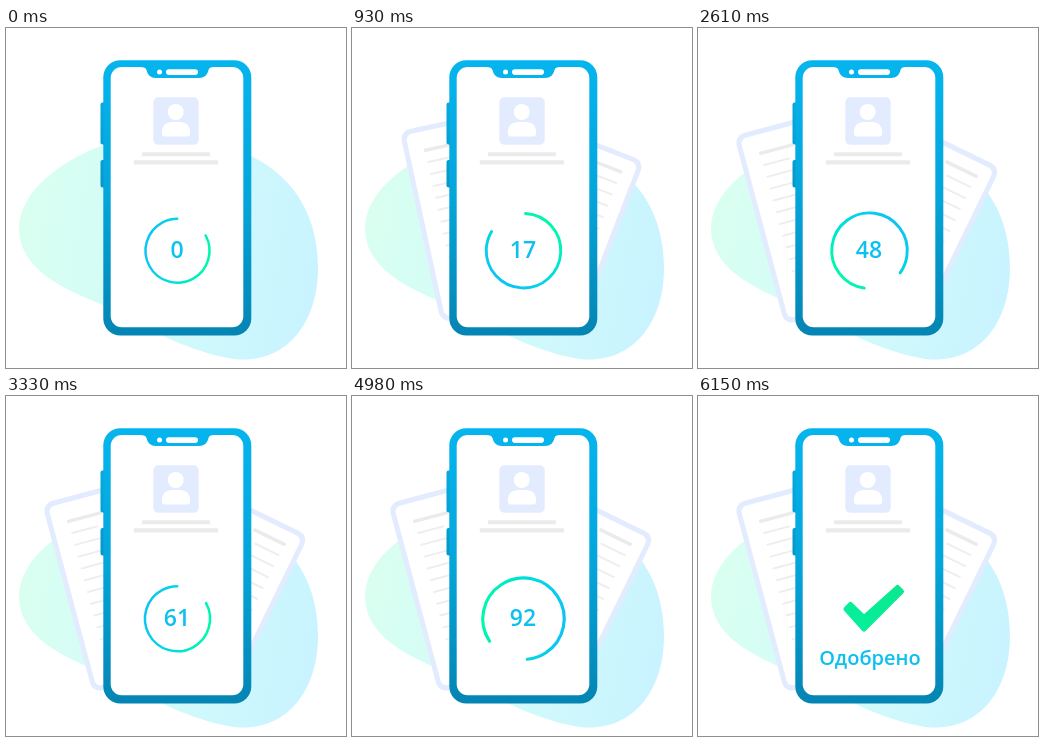
Recreate the animation shown at these times as an HTML page with a canvas. Size 340x340 px, loop 7.56 s.

```html
<!DOCTYPE html>
<html lang="ru">
<head>
<meta charset="utf-8">
<title>Одобрено</title>
<style>
  html, body { margin: 0; width: 100%; height: 100%; overflow: hidden; background: #fff; }
  canvas { display: block; width: 340px; height: 340px; }
</style>
</head>
<body>
<canvas id="stage"></canvas>
<script>
const SIZE = 340, LOOP = 7560, STEP = 30;
const DEG = Math.PI / 180;
const FONT = '"Open Sans", "Noto Sans", sans-serif';
const CYAN = '#0cc0f0', PALE = '#e3ebff', GREY = '#ebebeb';

const canvas = document.getElementById('stage');
const ctx = canvas.getContext('2d');
const dpr = window.devicePixelRatio || 1;
canvas.width = canvas.height = SIZE * dpr;

const clamp = v => Math.min(1, Math.max(0, v));
const span = (t, from, to) => clamp((t - from) / (to - from));
const easeSine = p => (1 - Math.cos(Math.PI * p)) / 2;
const easeOut = p => 1 - (1 - p) ** 3;

function gradient(x0, y0, x1, y1, ...colors) {
  const g = ctx.createLinearGradient(x0, y0, x1, y1);
  colors.forEach((c, i) => g.addColorStop(i / (colors.length - 1), c));
  return g;
}

function box(x, y, w, h, r, fill) {
  ctx.beginPath();
  ctx.roundRect(x, y, w, h, r);
  ctx.fillStyle = fill;
  ctx.fill();
}

function disc(x, y, r, fill) {
  ctx.beginPath();
  ctx.arc(x, y, r, 0, 2 * Math.PI);
  ctx.fillStyle = fill;
  ctx.fill();
}

function label(text, x, y, size) {
  ctx.font = `600 ${size}px ${FONT}`;
  ctx.textAlign = 'center';
  ctx.fillStyle = CYAN;
  ctx.fillText(text, x, y);
}

const blobPath = new Path2D(
  'M13 200C14 165 50 135 97 117C150 98 200 105 245 128C290 150 312 190 312 240' +
  'C312 300 275 340 222 330C185 323 150 306 97 277C60 262 13 242 13 200Z');
const notchPath = new Path2D(
  'M134 38H208V39C204.500 39 203 40 202.500 42C201.500 47 198 50 193 50' +
  'H150C145 50 141.500 47 140.500 42C140 40 138 39 134 39Z');
const personPath = new Path2D(
  'M156 106V104C156 97.500 160 94 166 94H174C180 94 184 97.500 184 104V106' +
  'Q184 108.500 181.500 108.500H158.500Q156 108.500 156 106Z');
const checkPath = new Path2D('M148 213L152.500 208.500L166 221.500L199.500 191.500L203.500 195.500L166 233Z');

function blob() {
  ctx.fillStyle = gradient(13, 190, 312, 245, '#d9fff0', '#d2fbfa', '#c9f3ff');
  ctx.fill(blobPath);
}

// A sheet hinged at its lower outer corner; side -1 leans left, 1 leans right.
function sheet(side, x, y, angle, h, firstLine, inset) {
  ctx.save();
  ctx.translate(x, y);
  ctx.rotate(side * angle * DEG);
  ctx.scale(-side, 1);
  ctx.translate(0, -h);
  box(0, 0, 130, h, 10, PALE);
  box(5, 5, 120, h - 10, 6, '#fff');
  box(inset, firstLine - 1.7, 36, 3.4, 1.5, GREY);
  for (let i = 1; i < 12; i++) {
    box(inset + 1, firstLine + i * 12.2 - 1, i % 4 === 1 ? 28 : 70, 2, 1, '#eeeeee');
  }
  ctx.restore();
}

function sheets(t) {
  const p = easeSine(span(t, 0, 1300));
  if (p === 0) return;
  sheet(-1, 99 - 12.3 * p, 285 + 11.8 * p, 15 * p, 195.8, 24, 19.5);
  sheet(1, 244 - 20.3 * p, 299 + 2.5 * p, 26 * p, 180, 18.4, 16.5);
}

function phone() {
  const side = gradient(0, 75, 0, 160, '#06a9de', '#0597c8');
  box(94.5, 74.5, 6, 42, 2, side);
  box(94.5, 132, 6, 27.5, 2, side);
  box(97.3, 32.3, 148, 275.2, 17, gradient(0, 32, 0, 307, '#05b5ee', '#04a5da', '#0485b3'));
  box(104.7, 39, 132.6, 260.3, 11, '#fff');
  ctx.fillStyle = '#05b4ed';
  ctx.fill(notchPath);
  disc(153.5, 44, 2.5, '#fff');
  box(160, 41.3, 32, 5.6, 2.8, '#fff');
}

function profile() {
  box(147.3, 69.2, 45.4, 47.6, 5, PALE);
  disc(169.7, 84, 8, '#fff');
  ctx.fillStyle = '#fff';
  ctx.fill(personPath);
  box(136, 124.3, 68, 4, 1, GREY);
  box(127.7, 132.3, 84.5, 4.2, 1, GREY);
}

function counter(t) {
  const alpha = 1 - span(t, 5460, 5700);
  if (alpha === 0) return;
  const r = 37 - 5 * Math.cos(2 * Math.PI * t / 3600);
  ctx.save();
  ctx.globalAlpha = alpha;
  label(Math.min(100, Math.floor(t / 54)), 171, 230, 23);
  ctx.translate(171.5, 222.7);
  ctx.rotate((331.5 + t * 360 / 1110) * DEG);
  const gx = r * Math.cos(40 * DEG), gy = r * Math.sin(40 * DEG);
  ctx.strokeStyle = gradient(gx, gy, -gx, -gy, '#00f8ac', '#00dcdc', '#0cc4f6');
  ctx.lineWidth = r * 0.077;
  ctx.lineCap = 'round';
  ctx.beginPath();
  ctx.arc(0, 0, r, 0, 298 * DEG);
  ctx.stroke();
  ctx.restore();
}

function approval(t) {
  const p = easeOut(span(t, 5490, 6150));
  if (p === 0) return;
  ctx.save();
  ctx.globalAlpha = p;
  ctx.translate(0, 16 * (1 - p));
  const green = gradient(150, 235, 200, 190, '#06f09c', '#0ae890');
  ctx.fillStyle = ctx.strokeStyle = green;
  ctx.lineWidth = 5;
  ctx.lineJoin = 'round';
  ctx.fill(checkPath);
  ctx.stroke(checkPath);
  label('Одобрено', 172, 269, 20);
  ctx.restore();
}

function draw(now) {
  const t = Math.floor((now % LOOP) / STEP) * STEP;
  ctx.setTransform(dpr, 0, 0, dpr, 0, 0);
  ctx.fillStyle = '#fff';
  ctx.fillRect(0, 0, SIZE, SIZE);
  blob();
  sheets(t);
  phone();
  profile();
  counter(t);
  approval(t);
}

let start;
function tick(now) {
  start ??= now;
  draw(Math.max(0, now - start));
  requestAnimationFrame(tick);
}
draw(0);
requestAnimationFrame(tick);
</script>
</body>
</html>
```
